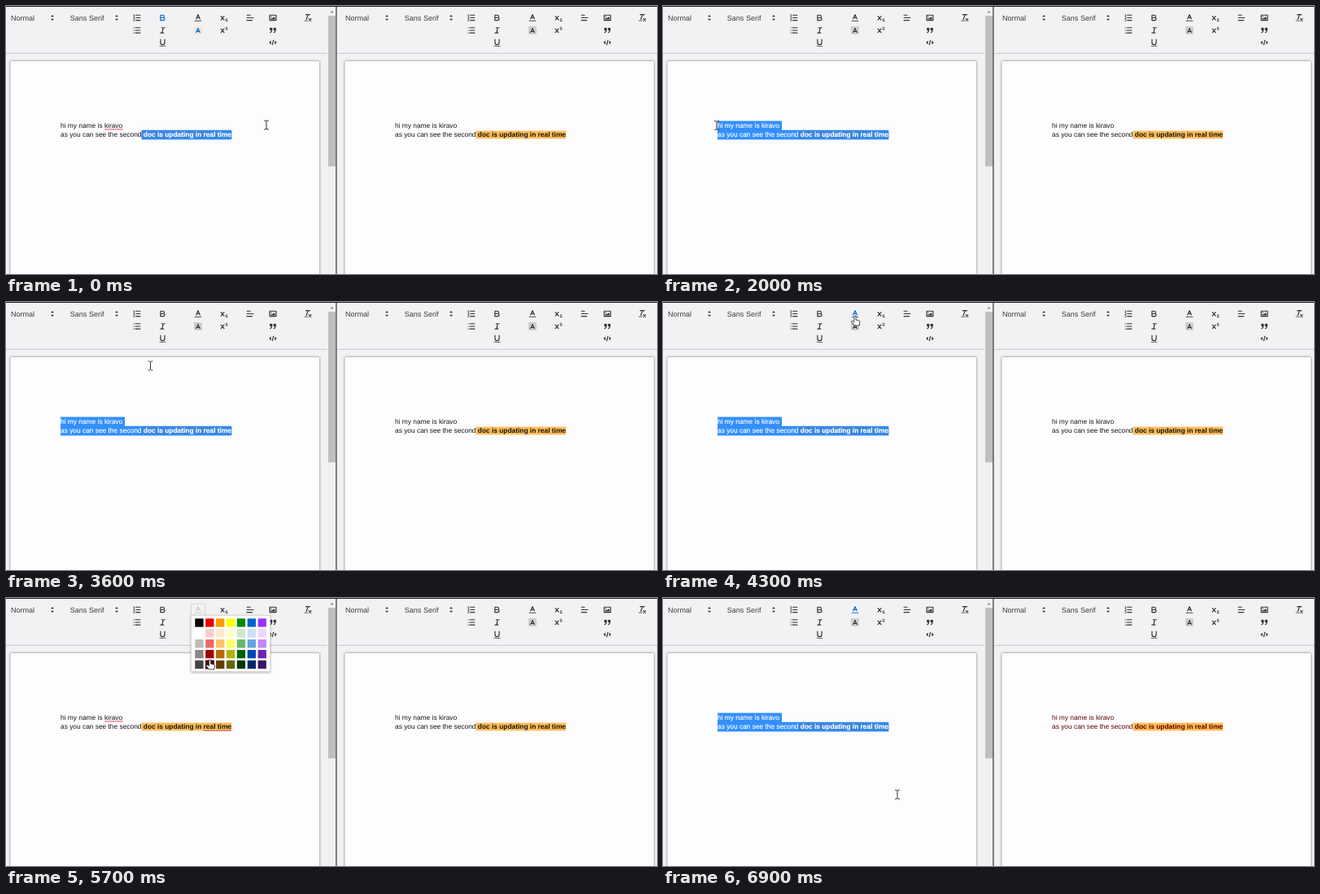
Animation, 800 px wide and 330 px high, one loop 7000 ms. Source, as an HTML page:

```html
<!DOCTYPE html>
<html lang="en">
<head>
<meta charset="utf-8">
<title>Shared document</title>
<style>
  html, body { margin: 0; height: 100%; overflow: hidden; }
  svg { display: block; width: 100vw; height: 100vh; background: #f2f1f4;
        font-family: "Liberation Sans", Arial, sans-serif; text-rendering: geometricPrecision; }
  .icon { color: #333; stroke: currentColor; stroke-width: 1.85; fill: none;
          stroke-linecap: round; stroke-linejoin: round; }
  .icon .thin { stroke-width: 1; }
  .icon .solid { fill: currentColor; stroke: none; }
  .page { fill: #fdfcfe; filter: drop-shadow(0 0 1.6px rgba(0, 0, 0, .55)); }
  .label { font-size: 9.04px; fill: #3c3c3c; }
  .squiggle { stroke: #e2445c; stroke-width: 1.2; stroke-dasharray: 1.6 .5; }
</style>
</head>
<body>
<svg viewBox="0 0 800 330" preserveAspectRatio="none">
  <defs>
    <g id="words" font-size="8.37">
      <text x="67" y="149.9">hi my name is kiravo</text>
      <text x="67" y="161.4">as you can see the second<tspan font-weight="700"> doc is updating in real time</tspan></text>
    </g>
    <rect id="mark" x="166.6" y="153.6" width="110.7" height="9.8"/>
    <clipPath id="selected">
      <rect id="line1" y="141.4" height="11.6"/>
      <rect id="line2" y="152.8" height="11.8"/>
    </clipPath>
  </defs>

  <g id="panes"></g>

  <use href="#mark" fill="#fdbb55"/>
  <use href="#words" fill="#161616"/>
  <path class="squiggle" d="M121.3 151.9H143.5M243 163.3H277"/>
  <path id="caret" d="M143.8 142v10" stroke="#000" stroke-width=".9"/>
  <g clip-path="url(#selected)">
    <path d="M60 140H290V166H60z" fill="#338ffb"/>
    <use href="#mark" fill="#3a86df"/>
    <use href="#words" fill="#fff" stroke="#fff" stroke-width=".15"/>
  </g>

  <g transform="translate(411)">
    <use href="#mark" fill="#fdbb55"/>
    <use id="remote" href="#words"/>
  </g>

  <path d="M395.5 1H405V330H395.5z" fill="#f1f1f1"/>
  <path d="M396 12H405V197.6H396z" fill="#bfbfbf"/>
  <path d="M398.3 8.3L400.5 5.8 402.7 8.3z" fill="#888"/>
  <path d="M405 0H406.7V330H405z" fill="#69696c"/>
  <path d="M0 0H800V1H0z" fill="#242429"/>

  <g id="palette">
    <path d="M227.5 7.2H244.8V21.5H227.5z" fill="none" stroke="#ccc" stroke-width=".7"/>
    <rect x="227.5" y="21.3" width="97.2" height="69.4" fill="#fff" stroke="#ccc" stroke-width=".6"
          style="filter:drop-shadow(0 1px 1.5px rgba(0,0,0,.3))"/>
    <g id="swatches"></g>
    <rect id="hover" width="10" height="10" fill="none" stroke="#000" stroke-width=".7"/>
  </g>

  <path id="beam" d="M-2.8-5.5q2.3 0 2.8 1 .5-1 2.8-1M0-4.5v9M-2.8 5.5q2.3 0 2.8-1 .5 1 2.8 1"
        fill="none" stroke="#333"/>
  <path id="hand" d="M-1.1 1a1.1 1.1 0 0 1 2.2 0v4l3.7.9q1.4.4 1.2 2l-.8 4.1h-6l-3.8-4.8q.4-1.6 1.9-.7l1.6 1.1z"
        fill="#fff" stroke="#333" stroke-width=".9" stroke-linejoin="round"/>
</svg>
<script>
const $ = id => document.getElementById(id);
const X_MARK = '<path d="M3 6.2L9 13M9 6.2L3 13"/>';
const small2 = y => `<path stroke-width="1.3" d="M12 ${y + 1}q.3-1.4 1.7-1.2 1.7.4 1 2L12 ${y + 4.3}h3.6"/>`;

// Each icon: centre x, centre y, drawing on an 18 unit grid
const icons = {
  ordered: [161, 14.5, '<path d="M7 4H15M7 9H15M7 14H15"/><path class="thin" d="M2.5 3l1-.6v3.1M2.5 5.5h2M2.5 7.8q2-.9 1.8.5L2.5 10.5h2M2.5 12.4h1.8L3.3 13.6q1.3.1.9 1.3t-1.8.4"/>'],
  bullet: [161, 30, '<path d="M6 4H15M6 9H15M6 14H15M3 4h0M3 9h0M3 14h0"/>'],
  bold: [192.5, 14.5, '<path d="M5 4H9.5a2.5 2.5 0 0 1 0 5H5zM5 9h5.5a2.5 2.5 0 0 1 0 5H5z"/>'],
  italic: [192.5, 30, '<path d="M7 4H13M5 14H11M8 14L10 4"/>'],
  underline: [192.5, 45, '<path d="M5 3V9a4 4 0 0 0 8 0V3"/><path class="solid" d="M3 15h12v1.2H3z"/>'],
  color: [236, 14.5, '<path d="M3 15H15" opacity=".7"/><path d="M5.5 11L9 3 12.5 11M11.6 9H6.4"/>'],
  background: [236, 30, '<g class="fill thin" stroke-dasharray="1 1.6" opacity=".5"><path d="M2.5 2.5h13v13h-13z"/><path d="M4.5 4.5h9v9h-9z"/></g><path d="M5.5 13L9 5 12.5 13M11.6 11H6.4"/>'],
  sub: [268, 14.5, X_MARK + small2(11)],
  sup: [268, 30, X_MARK + small2(3)],
  align: [300, 14.5, '<path d="M3 9H15M3 14H13M3 4H9"/>'],
  image: [328, 14.5, '<path d="M3 4H15V14H3z"/><path class="solid" d="M5 12V11L7 9 8 10 11 7 13 9V12zM5 7a1 1 0 0 1 2 0 1 1 0 0 1-2 0"/>'],
  quote: [328, 30, '<path fill="currentColor" d="M4 5h3v3H4zM11 5h3v3h-3z"/><path d="M7 8c0 4-3 5-3 5M14 8c0 4-3 5-3 5"/>'],
  code: [328, 45, '<path d="M5 7L3 9 5 11M13 7L15 9 13 11M10 5L8 13"/>'],
  clean: [371, 14.5, '<path d="M5 3H13M6 12L9.35 3M11 11L15 15M15 11L11 15"/><path class="solid" d="M2 14h7v1.2H2z"/>'],
};
const arrows = '<path class="solid" d="M5.8 11L9 14.4 12.2 11zM5.8 7L9 3.6 12.2 7z"/>';

const drawIcon = (id, [x, y, shape]) =>
  `<g class="icon" id="${id}" transform="translate(${x - 5.8} ${y - 5.8}) scale(.644)">${shape}</g>`;

const drawPane = (side, dx) => `<g transform="translate(${dx})">
  <path d="M${dx && -4} 58.3H395" stroke="#c9c8cc"/>
  <rect class="page" x="5.5" y="68" width="379.5" height="300"/>
  <text class="label" x="6" y="17.8">Normal</text>
  <text class="label" x="78.8" y="17.8">Sans Serif</text>
  ${[57, 136].map((x, i) => drawIcon(side + '-arrow' + i, [x, 14.5, arrows])).join('')}
  ${Object.entries(icons).map(([name, icon]) => drawIcon(side + '-' + name, icon)).join('')}</g>`;
$('panes').innerHTML = drawPane('left', 0) + drawPane('right', 411);

const CELL = 12.88;
const colors = `000 e60000 f90 ff0 008a00 06c 93f
  fff facccc ffebcc ffc cce8cc cce0f5 ebd6ff
  bbb f06666 ffc266 ff6 66b966 66a3e0 c285ff
  888 a10000 b26b00 b2b200 006100 0047b2 6b24b2
  444 5c0000 663d00 660 003700 002966 3d1466`.split(/\s+/);
$('swatches').innerHTML = colors.map((c, i) =>
  `<rect x="${232.3 + i % 7 * CELL}" y="${25.3 + (i / 7 | 0) * CELL}" width="10.3" height="10.3" fill="#${c}"/>`).join('');

// Pointer path: time, x, y
const path = [
  [0, 320, 146.5], [900, 320, 146.5], [1000, 318, 154.5], [1200, 292, 186], [1350, 255, 180],
  [1500, 200, 162], [1600, 130, 158], [1700, 76, 149], [1900, 66, 147], [2200, 66, 147],
  [2800, 140, 169], [3100, 140, 169], [3900, 200, 24], [4300, 236, 17], [5100, 236, 17],
  [5200, 238, 29], [5500, 266, 56], [5700, 250.5, 76], [6000, 250.5, 76], [6100, 250, 69],
  [6600, 280, 215], [6800, 288, 239], [6900, 288, 242],
];
function pointerAt(t) {
  const next = path.findIndex(p => p[0] >= t);
  if (next < 1) return path[0].slice(1);
  const [t0, x0, y0] = path[next - 1], [t1, x1, y1] = path[next];
  const k = (t - t0) / (t1 - t0);
  return [x0 + (x1 - x0) * k, y0 + (y1 - y0) * k];
}

const show = (id, on) => $(id).style.display = on ? '' : 'none';
const between = (t, a, b) => t >= a && t < b;

function select(id, from, to) {
  $(id).setAttribute('x', from);
  $(id).setAttribute('width', Math.max(0, to - from));
}

// Left edge of the selection on both lines
function selectionAt(t, x, y) {
  if (t < 300) return [146, 166.6];
  if (between(t, 2000, 4500) || t >= 6100) return [67, 67];
  if (!between(t, 1300, 2000) || y > 165) return [146, 277.3];
  return y > 152.8 ? [146, Math.max(67, x)] : [Math.max(67, x), 67];
}

function render(t) {
  const [x, y] = pointerAt(t);
  const open = between(t, 4500, 6100), formatted = t < 700;
  const onHand = between(t, 3200, 6100) && y < 56 || open;

  const [first, second] = selectionAt(t, x, y);
  select('line1', first, 146);
  select('line2', second, 277.3);
  show('caret', between(t, 300, 1100));

  $('left-bold').style.color = formatted ? '#06c' : '';
  $('left-background').style.color = formatted ? '#06c' : '';
  $('left-background').querySelector('.fill').style.stroke = formatted ? '#fdbb55' : '';
  $('left-color').style.color = open ? '#ccc' : t >= 4200 ? '#06c' : '';
  $('remote').setAttribute('fill', t >= 6100 ? '#5c0000' : '#161616');

  show('palette', open);
  const col = Math.floor((x - 231) / CELL), row = Math.floor((y - 24) / CELL);
  show('hover', row >= 0);
  $('hover').setAttribute('x', 232.5 + col * CELL);
  $('hover').setAttribute('y', 25.5 + row * CELL);

  show('hand', onHand);
  show('beam', !onHand);
  for (const id of ['hand', 'beam']) $(id).setAttribute('transform', `translate(${x} ${y})`);
}

const start = performance.now();
(function tick() {
  render(Math.floor((performance.now() - start) % 7000 / 100) * 100);
  requestAnimationFrame(tick);
})();
</script>
</body>
</html>
```
